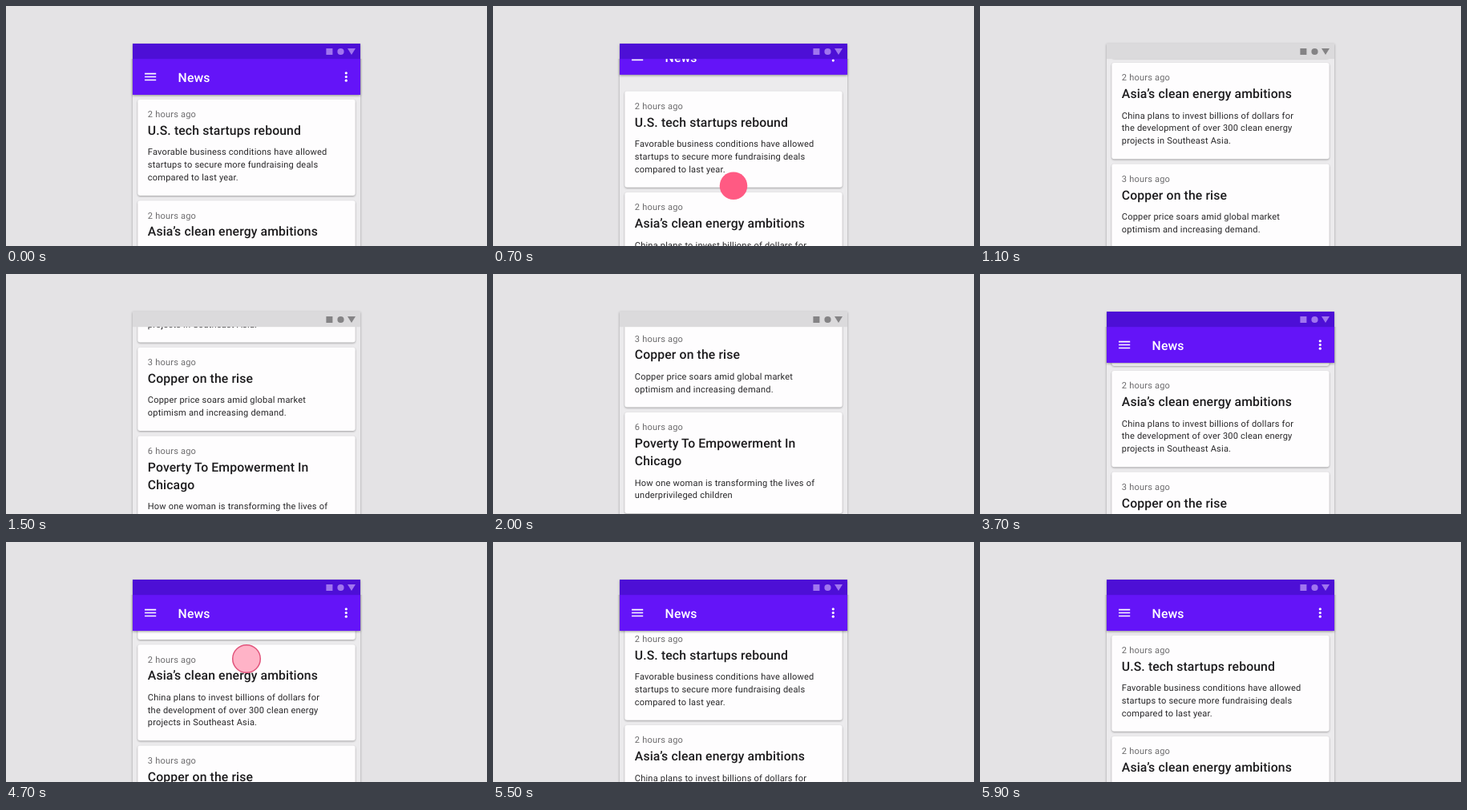
An HTML page that plays this animation: 600 px wide and 300 px high, repeating every 6.2 s.

```html
<!DOCTYPE html>
<html lang="en">
<head>
<meta charset="utf-8">
<title>News list</title>
<style>
  html, body { margin: 0; width: 100%; height: 100%; overflow: hidden; background: #e4e3e5; }
  svg { display: block; width: 600px; height: 300px; }
  text { font-family: Roboto, sans-serif; text-rendering: geometricPrecision; }
  .phone { fill: #ecebed; filter: drop-shadow(0 1px 1.5px rgba(0, 0, 0, .32)); }
  .card rect { fill: #fefdfe; filter: drop-shadow(0 1px .8px rgba(0, 0, 0, .32)); }
  .time, .body { font-size: 11.05px; letter-spacing: .197px; }
  .time { fill: #6c6b6d; }
  .body { fill: #272628; }
  .title { font-size: 15.78px; font-weight: 500; letter-spacing: .118px; fill: #1d1c1e; }
  .bar { fill: #6414f8; filter: drop-shadow(0 1px 1.5px rgba(0, 0, 0, .4)); }
  .ink, .ink .title { fill: #fff; }
  #touch { fill: #ff5a83; stroke: #e2557c; }
</style>
</head>
<body>
<svg viewBox="0 0 600 300">
  <defs>
    <clipPath id="screen"><rect x="158" y="66" width="284" height="234"/></clipPath>
    <clipPath id="below"><rect x="150" y="66" width="300" height="234"/></clipPath>
  </defs>
  <rect class="phone" x="158" y="47" width="284" height="270"/>
  <g clip-path="url(#screen)"><g id="list"></g></g>
  <g clip-path="url(#below)">
    <g id="bar">
      <rect class="bar" x="158" y="47" width="284" height="64"/>
      <g class="ink">
        <path d="M173 83.8h14.2v1.6H173zM173 87.75h14.2v1.6H173zM173 91.7h14.2v1.6H173z"/>
        <text class="title" x="214.6" y="95">News</text>
        <circle cx="424.3" cy="83.8" r="1.6"/>
        <circle cx="424.3" cy="88.5" r="1.6"/>
        <circle cx="424.3" cy="93.2" r="1.6"/>
      </g>
    </g>
  </g>
  <rect id="status" x="158" y="47" width="284" height="19.2"/>
  <path id="icons" d="M399.4 53h8v8h-8zM413.4 57a4.1 4.1 0 1 0 8.2 0a4.1 4.1 0 1 0-8.2 0zM426 53h10l-5 8z"/>
  <circle id="touch" cx="300" r="17.3"/>
</svg>
<script>
const LOOP = 6200, TICK = 100;
const BAR_TRAVEL = 64, STATUS = 19;
const $ = id => document.getElementById(id);

const news = [
  ['2 hours ago', ['U.S. tech startups rebound'],
    ['Favorable business conditions have allowed', 'startups to secure more fundraising deals', 'compared to last year.']],
  ['2 hours ago', ['Asia’s clean energy ambitions'],
    ['China plans to invest billions of dollars for', 'the development of over 300 clean energy', 'projects in Southeast Asia.']],
  ['3 hours ago', ['Copper on the rise'],
    ['Copper price soars amid global market', 'optimism and increasing demand.']],
  ['6 hours ago', ['Poverty To Empowerment In', 'Chicago'],
    ['How one woman is transforming the lives of', 'underprivileged children']]
];

// Each swipe: touch time, scroll start and end times, scroll range, touch height
const swipes = [
  { touch: 500, start: 530, end: 2050, from: 0, to: 307.5, y: 235 },
  { touch: 2800, start: 2907, end: 3950, from: 307.5, to: 115, y: 96 },
  { touch: 4700, start: 4825, end: 5950, from: 115, to: 0, y: 146 }
];

const line = (kind, y, str) => `<text class="${kind}" x="176.8" y="${y.toFixed(2)}">${str}</text>`;

function buildList() {
  let top = 116.8, html = '';
  for (const [time, title, body] of news) {
    const bodyY = top + 69.6 + (title.length - 1) * 22.1;
    const height = bodyY - top + (body.length - 1) * 15.8 + 18.9;
    html += `<g class="card"><rect x="164.3" y="${top}" width="271.4" height="${height}" rx="3"/>`
      + line('time', top + 22.3, time)
      + title.map((s, i) => line('title', top + 44.2 + i * 22.1, s)).join('')
      + body.map((s, i) => line('body', bodyY + i * 15.8, s)).join('') + '</g>';
    top += height + 6.3;
  }
  $('list').innerHTML = html;
}

const clamp = v => Math.min(1, Math.max(0, v));

// cubic-bezier(.4, 0, .2, 1)
function ease(x) {
  let lo = 0, hi = 1;
  for (let i = 0; i < 24; i++) {
    const s = (lo + hi) / 2, r = 1 - s;
    if (1.2 * r * r * s + .6 * r * s * s + s * s * s < x) lo = s; else hi = s;
  }
  return lo * lo * (3 - 2 * lo);
}

const ramp = (t, a, b) => t <= a ? 0 : t >= b ? 1 : ease((t - a) / (b - a));
const mix = (a, b, k) => `rgb(${a.map((v, i) => Math.round(v + (b[i] - v) * k))})`;

function draw(t) {
  const swipe = swipes.filter(s => t >= s.touch).pop() || swipes[0];
  const scroll = swipe.from + (swipe.to - swipe.from) * ramp(t, swipe.start, swipe.end);
  $('list').setAttribute('transform', `translate(0 ${-scroll.toFixed(2)})`);

  const hidden = BAR_TRAVEL * (ramp(t, 530, 1080) - ramp(t, 3015, 3480));
  const tint = clamp((BAR_TRAVEL - hidden) / STATUS);
  $('bar').setAttribute('transform', `translate(0 ${-hidden.toFixed(2)})`);
  $('bar').style.visibility = tint ? 'visible' : 'hidden';
  $('status').style.fill = mix([219, 218, 220], [77, 15, 214], tint);
  $('icons').style.fill = mix([132, 131, 133], [160, 117, 239], tint);

  const age = t - swipe.touch, touch = $('touch');
  const faint = age < 100 || age >= 500;
  touch.style.visibility = age >= 0 && age < 600 ? 'visible' : 'hidden';
  touch.style.fillOpacity = faint ? .45 : 1;
  touch.style.strokeWidth = faint ? 1.5 : 0;
  touch.setAttribute('cy', swipe.y + swipe.from - scroll);
}

buildList();
const t0 = performance.now();
function loop() {
  const t = (performance.now() - t0) % LOOP;
  draw(Math.floor(t / TICK) * TICK);
  requestAnimationFrame(loop);
}
loop();
</script>
</body>
</html>
```
